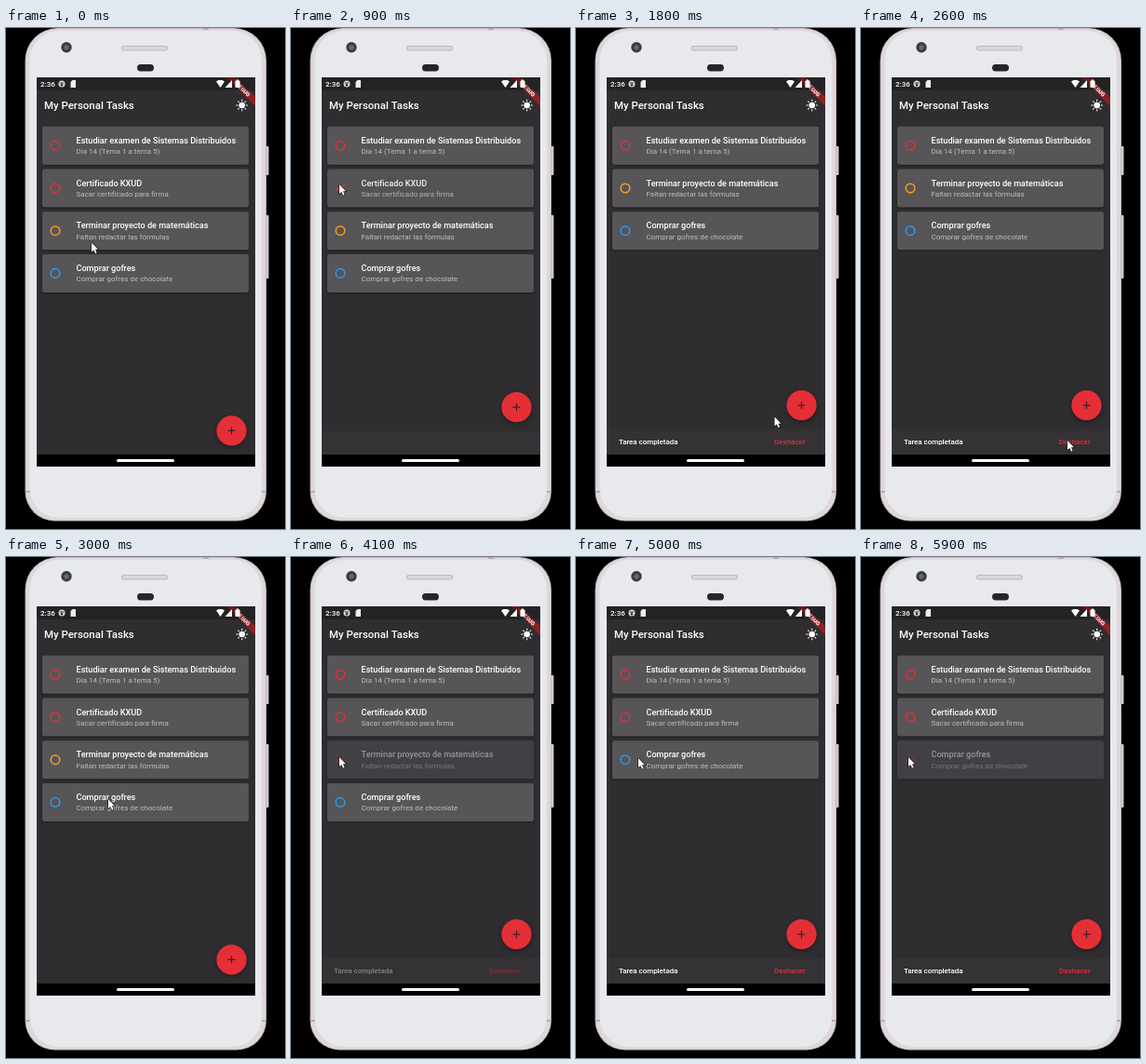
An HTML page with a canvas that plays this animation: 300x538 px, repeating every 6000 ms.

```html
<!DOCTYPE html>
<html lang="es">
<head>
<meta charset="utf-8">
<title>My Personal Tasks</title>
<style>
  html, body { margin: 0; height: 100%; overflow: hidden; background: #000; }
  canvas { display: block; width: 300px; height: 538px; }
</style>
</head>
<body>
<canvas></canvas>
<script>
const LOOP = 6000, STEP = 100, FADE = 700;
const BG = '#2f2d30', CARD = '#575558', RED = '#e52f37';
const canvas = document.querySelector('canvas');
const g = canvas.getContext('2d');
const dpr = window.devicePixelRatio || 1;
canvas.width = 300 * dpr;
canvas.height = 538 * dpr;

const tasks = [
  ['Estudiar examen de Sistemas Distribuidos', 'Día 14 (Tema 1 a tema 5)', RED],
  ['Certificado KXUD', 'Sacar certificado para firma', RED],
  ['Terminar proyecto de matemáticas', 'Faltan redactar las fórmulas', '#ff9c1c'],
  ['Comprar gofres', 'Comprar gofres de chocolate', '#2b9cf0']
];
// A completed task fades from start and stays away until the undo.
const completions = [
  { task: 1, start: 850, until: 2700 },
  { task: 2, start: 3750, until: LOOP },
  { task: 3, start: 5550, until: LOOP }
];
const snacks = [[650, 2650], [3750, LOOP + 1000]];
const pointer = [ // time, x, y
  [0, 92, 230.5], [500, 52, 168], [900, 52, 168], [1500, 205, 393], [2100, 222, 442],
  [2600, 222, 443], [3000, 110, 260], [3200, 110, 260], [3700, 52, 214],
  [4100, 52, 215], [4500, 123, 287], [5000, 67, 216], [5200, 51, 214], [6000, 51, 215]
];

const clamp = v => Math.max(0, Math.min(1, v));
const smooth = v => { v = clamp(v); return v * v * (3 - 2 * v); };

function box(x, y, w, h, r, fill) {
  g.fillStyle = fill;
  g.beginPath();
  g.roundRect(x, y, w, h, r);
  g.fill();
}
function disc(x, y, r, fill) {
  g.fillStyle = fill;
  g.beginPath();
  g.arc(x, y, r, 0, 7);
  g.fill();
}
function poly(points, fill) {
  g.fillStyle = fill;
  g.beginPath();
  points.forEach(([x, y]) => g.lineTo(x, y));
  g.closePath();
  g.fill();
}
function line(points, stroke, width) {
  g.strokeStyle = stroke;
  g.lineWidth = width;
  g.beginPath();
  points.forEach(([x, y]) => g.lineTo(x, y));
  g.stroke();
}
function text(str, x, y, size, fill, weight = 400, spacing = 0) {
  g.font = `${weight} ${size}px Roboto, sans-serif`;
  g.letterSpacing = spacing + 'px';
  g.fillStyle = fill;
  g.fillText(str, x, y);
}
function shadow(blur, y, alpha) {
  g.shadowColor = `rgba(0,0,0,${alpha})`;
  g.shadowBlur = blur * dpr;
  g.shadowOffsetY = y * dpr;
}

function drawPhone() {
  box(277, 127, 5.5, 31, 1, '#d2cbd0');
  box(277, 201, 5.5, 68, 1, '#d2cbd0');
  box(20.5, 0, 259.5, 529.5, [35, 35, 32, 32], '#c5bbc2');
  box(21.5, 1, 257.5, 527.5, [34, 34, 31, 31], '#e0d7dc');
  for (const x of [21, 275]) box(x, 497, 5, 2, 0, '#b3acb1');
  box(212, 0, 6, 2, 0, '#b3acb1');
  box(25.5, 3, 249.5, 523, 32, '#e7e9ed');
  disc(65, 20.8, 5.7, '#3a3c42');
  disc(65, 20.8, 2.6, '#656a73');
  box(124, 19, 50, 5.5, 2.7, '#b9bbc0');
  box(125, 20, 48, 3.5, 1.7, '#d6d8dc');
  box(141, 39, 18, 7.5, 3.7, '#25262a');
}

function drawBanner() {
  g.save();
  g.translate(268, 53);
  g.rotate(Math.PI / 4);
  box(-23, 15, 46, 6.9, 0, 'rgba(183,28,28,.7)');
  g.textAlign = 'center';
  text('DEBUG', 0, 20.5, 5.8, '#fff', 900);
  g.restore();
}

function drawHeader() {
  drawBanner();
  box(33, 53, 235, 14, 0, 'rgba(0,0,0,.25)');
  text('2:36', 37, 63, 8, '#fff', 500);
  disc(60, 60, 3.5, '#ddd');
  box(57.8, 58.5, 4.4, 1, 0, '#222');
  disc(60, 61.3, 1.2, '#222');
  poly([[69.5, 58], [71.5, 56], [75, 56], [75, 64], [69.5, 64]], '#eee');
  poly([[226, 57.5], [228.5, 56], [232.5, 56], [235, 57.5], [230.5, 64]], '#fff');
  poly([[243, 56], [243, 64], [235.5, 64]], '#fff');
  box(246.5, 56.5, 5, 7.5, 0.7, '#fff');
  box(248, 55.5, 2, 2, 0, '#fff');

  text('My Personal Tasks', 41, 87, 11.43, '#fff', 500, 0.02);
  disc(253.7, 83, 3.3, '#fff');
  for (let i = 0; i < 8; i++) {
    const c = Math.cos(i * Math.PI / 4), s = Math.sin(i * Math.PI / 4);
    line([[253.7 + 4.3 * c, 83 + 4.3 * s], [253.7 + 6.2 * c, 83 + 6.2 * s]], '#fff', 1.1);
  }
}

function drawTask([title, note, color], y, opacity) {
  shadow(2, 1, 0.4);
  box(39, y, 222, 41, 2.3, CARD);
  shadow(0, 0, 0);
  if (opacity < 1) {
    line([[48.7, y + 20.3], [51.7, y + 23.3], [57.8, y + 17]], RED, 1.9);
  } else {
    g.strokeStyle = color;
    g.lineWidth = 1.5;
    g.beginPath();
    g.arc(53, y + 20.5, 4.8, 0, 7);
    g.stroke();
  }
  text(title, 75.5, y + 18.2, 9.14, '#fff', 500, -0.02);
  text(note, 75.5, y + 29.4, 8, '#c0bec1', 400, 0.01);
  g.globalAlpha = 1 - opacity;
  box(36, y - 2, 228, 45.5, 0, BG);
  g.globalAlpha = 1;
}

function drawTasks(t) {
  let row = 0;
  tasks.forEach((task, i) => {
    const done = completions.find(c => c.task === i && t >= c.start && t < c.until);
    const opacity = done ? 1 - (t - done.start) / FADE : 1;
    if (opacity > 0) drawTask(task, 105.8 + 45.7 * row++, opacity);
  });
}

function drawSnack(t) {
  let rise = 0, ink = 0;
  for (const [start, end] of snacks) {
    if (t < start) continue;
    rise = smooth((t - start) / 300) * (1 - smooth((t - end) / 300));
    ink = clamp((t - start - 250) / 250) * (1 - clamp((t - end) / 150));
  }
  const top = 458 - 27.4 * rise;
  box(33, top, 235, 458 - top, 0, '#343235');
  g.globalAlpha = ink;
  text('Tarea completada', 46, top + 16.5, 8, '#fff', 500, -0.05);
  text('Deshacer', 213, top + 16.5, 8, RED, 500);
  g.globalAlpha = 1;

  const y = 432.4 - 27.2 * rise;
  shadow(4, 1.5, 0.4);
  disc(242.5, y, 16.1, RED);
  shadow(0, 0, 0);
  line([[238.5, y], [246.5, y]], '#2b2021', 1.1);
  line([[242.5, y - 4], [242.5, y + 4]], '#2b2021', 1.1);
}

function drawPointer(t) {
  const i = pointer.findIndex(p => p[0] > t);
  const [t0, x0, y0] = pointer[i - 1], [t1, x1, y1] = pointer[i];
  const k = smooth((t - t0) / (t1 - t0));
  const x = x0 + (x1 - x0) * k, y = y0 + (y1 - y0) * k;
  const arrow = [[0, 0], [0, 10], [2.3, 8], [4, 11.7], [5.6, 11], [4, 7.3], [7, 7.2], [0, 0]]
    .map(([dx, dy]) => [x + dx, y + dy]);
  line(arrow, '#111', 1.2);
  poly(arrow, '#fff');
}

function draw(t) {
  g.setTransform(dpr, 0, 0, dpr, 0, 0);
  box(0, 0, 300, 538, 0, '#000');
  drawPhone();
  g.save();
  g.beginPath();
  g.rect(33, 53, 235, 418);
  g.clip();
  box(33, 53, 235, 418, 0, BG);
  drawHeader();
  drawTasks(t);
  drawSnack(t);
  box(33, 458, 235, 13, 0, '#000');
  box(119, 463, 62, 3, 1.5, '#fff');
  g.restore();
  drawPointer(t);
}

const begin = performance.now();
function tick() {
  const t = (performance.now() - begin) % LOOP;
  draw(Math.floor(t / STEP) * STEP);
  requestAnimationFrame(tick);
}
tick();
</script>
</body>
</html>
```
